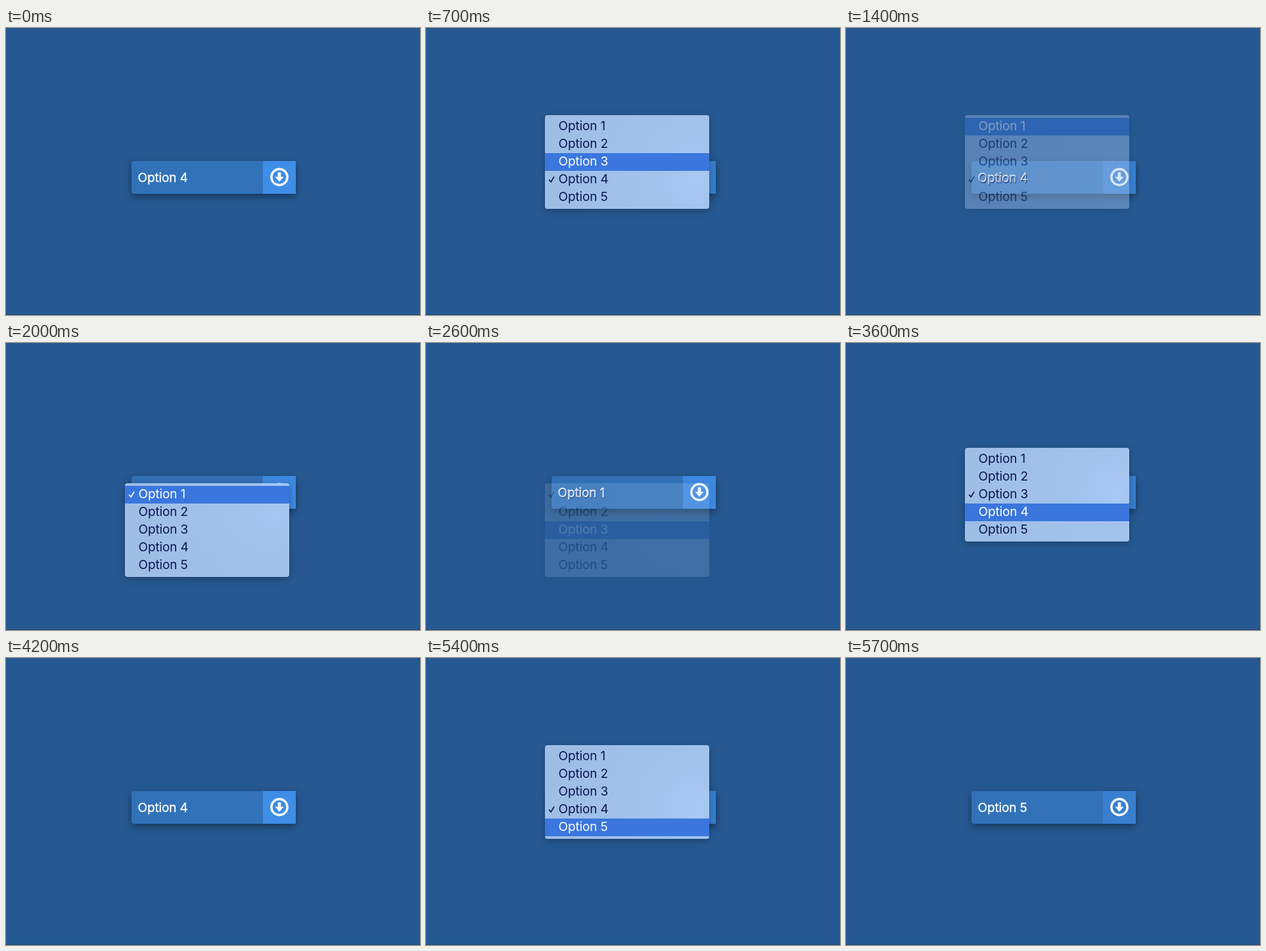
Animation, 630 px wide and 438 px high, one loop 5.8 s. Source, as an HTML page:

```html
<!DOCTYPE html>
<html lang="en">
<head>
<meta charset="utf-8">
<title>Select menu</title>
<style>
  html, body { margin: 0; width: 100%; height: 100%; overflow: hidden; background: #265992; }
  svg { display: block; width: 630px; height: 438px; }
  text { font: 19px Inter, "Open Sans", sans-serif; letter-spacing: -.12px; }
  #field { filter: drop-shadow(0 4px 6px rgba(0, 0, 0, .4)); }
  #value { fill: #fff; stroke: #fff; stroke-width: .3px; }
  #panel { filter: drop-shadow(0 3px 6px rgba(0, 0, 0, .28)); }
</style>
</head>
<body>
<svg viewBox="0 0 630 438">
  <defs>
    <radialGradient id="frost" gradientUnits="userSpaceOnUse" cx="412" cy="228" r="210">
      <stop offset="0" stop-color="#a7c9f3"/>
      <stop offset=".25" stop-color="#a2c3ed"/>
      <stop offset="1" stop-color="#9fbee6"/>
    </radialGradient>
  </defs>
  <rect width="630" height="438" fill="#265992"/>
  <path d="M0 437.5H630" stroke="#1c436f"/>

  <g id="field">
    <path d="M441 203H195a4 4 0 0 0-4 4v42a4 4 0 0 0 4 4h246z" fill="#3272b8"/>
    <rect id="button" x="391" y="203" width="50" height="50"/>
  </g>
  <g transform="translate(416 227.5)">
    <circle r="12.2" fill="none" stroke="#fff" stroke-width="3.4"/>
    <path d="M-2.3-7.3h4.6v6.8h4.2L0 7.2-6.5-.5h4.2z" fill="#fff"/>
  </g>
  <text id="value" x="200.5" y="235"></text>

  <g id="menu">
    <rect id="panel" x="181" width="250" height="143" rx="4" fill="url(#frost)"/>
    <rect id="highlight" x="181" width="250" height="27" fill="#3a76de"/>
    <path id="check" d="M187.5 231.8l2.6 3.2 4.6-7.6" fill="none" stroke="#0c1650"
          stroke-width="1.7" stroke-linecap="round" stroke-linejoin="round"/>
    <g id="labels"></g>
  </g>
</svg>
<script>
const LOOP = 5800, STEP = 100, ROW = 27, FADE = 275;

// One entry per opening: the chosen row before and after, and the hovered rows over time.
const sessions = [
  { from: 4, to: 1, close: 1240, hover: [[100, 4], [400, 5], [700, 3], [800, 2], [900, 1]] },
  { from: 1, to: 3, close: 2380, hover: [[1900, 1], [2100, 2], [2300, 3]] },
  { from: 3, to: 4, close: 3850, hover: [[3300, 3], [3500, 4]] },
  { from: 4, to: 5, close: 5410, hover: [[4800, 4], [5200, 5]] }
];
const glow = [[0, 1], [100, 1], [300, 0], [1500, 0], [1800, .7], [2800, .7], [3000, 0],
              [4000, 0], [4200, 1], [4300, 1], [4600, 0], [LOOP, 0]];

const get = id => document.getElementById(id);
const set = (id, name, value) => get(id).setAttribute(name, value);
const mix = (a, b, k) => a + (b - a) * k;

const labels = [1, 2, 3, 4, 5].map(n => {
  const label = document.createElementNS("http://www.w3.org/2000/svg", "text");
  label.textContent = "Option " + n;
  label.setAttribute("x", 201.5);
  get("labels").append(label);
  return label;
});

function ramp(keys, t) {
  const i = keys.findIndex(key => key[0] > t);
  const [t0, a] = keys[i - 1], [t1, b] = keys[i];
  return mix(a, b, (t - t0) / (t1 - t0));
}

function drawMenu({ from, close, hover }, t) {
  const top = 218 - ROW * (from - 1);
  const active = hover.filter(([start]) => start <= t).pop()[1];
  set("menu", "opacity", Math.min(1, 1 - (t - close) / FADE));
  set("panel", "y", top - 4);
  set("highlight", "y", top + ROW * (active - 1));
  labels.forEach((label, i) => {
    label.setAttribute("y", top + ROW * i + 19);
    label.setAttribute("fill", i + 1 === active ? "#fff" : "#0c1650");
  });
  set("check", "stroke", active === from ? "#fff" : "#0c1650");
}

function draw(t) {
  const open = sessions.find(s => t >= s.hover[0][0] && t < s.close + FADE);
  const done = sessions.filter(s => t >= s.close + FADE).pop();
  get("value").textContent = "Option " + (done ? done.to : sessions[0].from);

  const k = ramp(glow, t);
  set("button", "fill", `rgb(${mix(57, 62, k)}, ${mix(127, 141, k)}, ${mix(207, 231, k)})`);

  set("menu", "visibility", open ? "visible" : "hidden");
  if (open) drawMenu(open, t);
}

function tick() {
  draw(Math.floor(performance.now() % LOOP / STEP) * STEP);
  requestAnimationFrame(tick);
}
tick();
</script>
</body>
</html>
```
